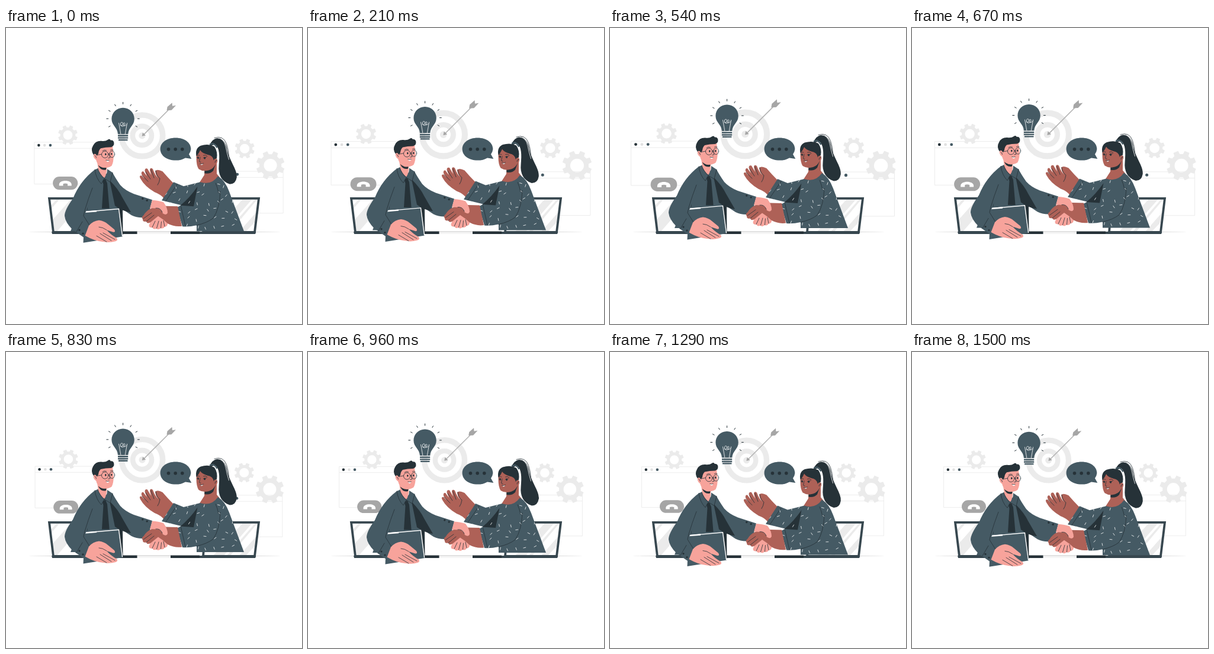
These frames come from a looping animation (500 px wide and 500 px high, 1.54 s). An HTML page:

```html
<!DOCTYPE html>
<html lang="en">
<head>
<meta charset="utf-8">
<title>Handshake</title>
<style>
html, body { margin: 0; width: 100%; height: 100%; overflow: hidden; background: #fff; }
svg { display: block; width: 100vw; height: 100vh; }
.slate { fill: #455a64; }
.ink { fill: #263238; }
.pale { fill: #ebebeb; }
.grey { fill: #a6a6a6; }
.rose { fill: #f7a39b; }
.brown { fill: #ae6157; }
.white { fill: #fff; }
.line { fill: none; stroke: #263238; stroke-width: .8; stroke-linecap: round; stroke-linejoin: round; }
.frame { fill: #fff; stroke: #ebebeb; stroke-width: .9; }
.thin { fill: none; stroke: #fff; stroke-width: .8; stroke-linecap: round; }
</style>
</head>
<body>
<svg viewBox="0 0 500 500">
  <defs>
    <clipPath id="dress">
      <path d="M328 260Q347 266 358 250Q370 257 377 276L402 343H322V333Q309 336 298 335L288.5 303L296 299L263 291L283 260L300 267Z"/>
    </clipPath>
    <clipPath id="screenL"><path d="M75 290H166L162 344H82Z"/></clipPath>
    <clipPath id="screenR"><path d="M334 290H425L418 344H338Z"/></clipPath>
  </defs>

  <ellipse cx="251" cy="344.4" rx="213" ry=".7" fill="#d0d0d0"/>

  <g id="back">
    <path class="frame" d="M48.5 193H165V263.5H48.5ZM48.5 203.3H165"/>
    <circle class="ink" cx="56" cy="198.2" r="2.3"/>
    <circle cx="65.8" cy="198.2" r="2.3" fill="#e0e0e0"/>
    <circle class="slate" cx="75.5" cy="198.2" r="2.3"/>
    <path class="frame" d="M360 242H467.5V312.5H360ZM360 252.3H467.5"/>
    <circle class="slate" cx="390.3" cy="247.2" r="2.4"/>
    <g id="gears" class="pale" fill-rule="evenodd"></g>
    <g fill="none" stroke="#ebebeb">
      <circle cx="230" cy="182" r="34.7" stroke-width="9.6"/>
      <circle cx="230" cy="182" r="16" stroke-width="8.6"/>
    </g>
    <circle class="pale" cx="230" cy="182" r="5.6"/>
    <path d="M232 181L276 137" stroke="#b2b2b2" stroke-width="1.5"/>
    <path class="grey" d="M229.7 183L231 176.8L236 181.6ZM271.5 139.5L272.5 133.5L280.5 126.5L281 132L287 131L279.5 139Z"/>
    <rect class="grey" x="79.7" y="251" width="42" height="22" rx="11"/>
    <path class="white" d="M90.3 264C91 256 110.5 256 111.2 264V266.4H104.6V263Q100.7 261.6 97 263V266.4H90.3Z"/>
  </g>

  <g>
    <path class="white" d="M73 288H168L164 345H80Z"/>
    <path class="white" d="M332 288H427L420 345H334Z"/>
    <g class="pale" clip-path="url(#screenL)">
      <path d="M76 327L109 290H133L84 346ZM74 302L86 289H91L75 307Z"/>
    </g>
    <g class="pale" clip-path="url(#screenR)">
      <path d="M349 345L400 289H416L367 345ZM372 345L421 289H425L378 345ZM393 345L424 310V324L404 345Z"/>
    </g>
    <g fill="none" stroke="#37474f" stroke-width="3.8">
      <path d="M73 287.9H168L164 345H80Z"/>
      <path d="M338 287.9H427L420 345H333Z"/>
    </g>
    <path fill="#37474f" d="M77 344H197V348H78ZM326 344H422L421 348H326Z"/>
    <path fill="#f5f5f5" d="M221 343.6H278V348H221Z"/>
    <path fill="#d0d0d0" d="M221 343.6H278V344.6H221Z"/>
    <path class="ink" d="M180 343.6H221.5V348H180ZM278 343.6H327V348H278Z"/>
  </g>

  <g>
    <path class="slate" d="M286.5 185.5C302 185.5 312.4 194 312.4 204.5Q312 209.5 309 213.3L313.3 221L303 219.4Q296 223.6 286.5 223.6C271 223.6 260.6 215 260.6 204.5S271 185.5 286.5 185.5Z"/>
    <g class="ink"><circle cx="274.5" cy="204.8" r="2.8"/><circle cx="286.2" cy="204.8" r="2.8"/><circle cx="297.8" cy="204.8" r="2.8"/></g>
  </g>

  <g id="front">
    <!-- bulb -->
    <g id="rays" stroke="#263238" stroke-width="1" stroke-linecap="round"></g>
    <path class="slate" d="M197.6 134.5C208.5 134.5 216.8 143 216.8 153.3C216.8 165 207 167 206.3 179H189C188.3 167 178.4 165 178.4 153.3C178.4 143 186.8 134.5 197.6 134.5Z"/>
    <path class="slate" d="M189 180.4H206.2V183H189ZM189 184.2H206.2V186.6H189ZM190 187.7H205.5V190H190Z"/>
    <path class="thin" d="M193.8 178.5L190.6 160.5M201.4 178.5L204.6 160.5M193 164C195 167 198.5 163 197.5 160.5S193 159 193.5 162.5S198 167 200 164S200.5 158.5 198.5 160.8S200 168 203.5 163"/>

    <!-- man -->
    <path class="slate" d="M150 239L168 246L180 244Q184 252 193 265Q201 274 216 280L247 290L240 319Q224 322 212 316L197 306V343H109Z"/>
    <path class="ink" d="M175 257Q190 272 196 285L211 311Q196 309 184 300Z"/>
    <path class="ink" d="M162.5 256.5L168 255L171 262L174.6 304.5H162L164.5 264Z"/>
    <path class="rose" d="M153 218L156 240Q160 249 166 253Q171 247 170 233Z"/>
    <path class="slate" d="M150 239L155 237Q158 247 166 253L161 263Q152 253 150 239ZM171 238L180 244L176 260L166 254Q171 248 171 238Z"/>
    <path class="line" d="M150 239Q152 254 161 263L166 254L176 260L180 244M155 237Q158 247 166 254M146 270Q138 290 137 307"/>
    <path class="ink" d="M155.8 231.5Q164 237 169.8 234.5L169 239Q160 241.5 155.8 231.5Z"/>
    <path class="rose" d="M152 209Q150.5 214 151.5 220Q154 233 163 235.6Q172 237 178.5 232.5Q182 226 181.7 214L180 199L160 197Z"/>
    <path class="rose" d="M154.5 214Q149 209.5 147.6 214.5Q147.8 221 154 223.5Z"/>
    <path class="ink" d="M147.8 214Q142.5 206 147 198.5Q151 190 161 190.5Q168 191.5 172 188.5Q175 186 177 189.5Q181 188.5 182.3 193Q183.5 199 177.5 201Q168 201 160 203Q156.5 206 156 212L153.5 215.5Q150.5 210 147.8 214Z"/>
    <g class="line">
      <circle cx="167.2" cy="213.6" r="5.7"/>
      <ellipse cx="179.2" cy="213" rx="4.4" ry="5.5"/>
      <path d="M161.5 213L153.5 214.5M173 212.5Q174 211.5 175 212.3M174.5 213L175.8 219L172.5 219.5M163 207.5Q166 204.8 169.5 206.6M176.5 206Q178.5 204.5 181 206M150 215Q152 215.5 152.5 219"/>
    </g>
    <ellipse class="ink" cx="168.3" cy="213" rx="1.3" ry="1.8"/>
    <ellipse class="ink" cx="178.2" cy="212.6" rx="1.2" ry="1.8"/>
    <path class="white" d="M168.8 223Q171.5 224.3 174.3 223Q173.5 226.3 171.6 226Q169.8 225.5 168.8 223Z"/>
    <path class="line" d="M168.8 223Q171.5 224.3 174.3 223"/>
    <circle class="ink" cx="230.8" cy="288" r="1.7"/>
    <circle class="ink" cx="238.2" cy="291" r="1.7"/>

    <!-- woman -->
    <path class="ink" d="M343 200Q347 187 358 185.5Q369 187 373 202C376 223 391 238 389.8 252Q388 263.5 378 263.5C364 259 358 247 359.6 232C361 215 361 202 353 196Z"/>
    <path class="line" d="M352 185.5Q367 180.5 372.5 195.5Q376 206 376.5 216"/>
    <path class="thin" d="M357 185.5Q368 186 371 200Q373 211 376.5 222"/>
    <path class="brown" d="M336 230L335 248L326 262Q344 274 361 252L356 246V222Z"/>
    <path class="ink" d="M335.5 237Q347 242 354 230L350 241Q344 247 335.3 245Z"/>
    <path class="brown" d="M283 262Q273 252 264.5 242Q256 237.5 252 241Q252.5 248 257 253Q252 249 248 238Q243.5 234.5 243 240L245 248L239 237.5Q234.5 236 234.5 241L238 250L232 242Q228 241.5 229 247L234 254L229 249Q224 248.5 227 254Q234 267 251 277Q262 281 267 288Z"/>
    <path class="line" d="M236 243L244 255M245 239L250 253M230 249L240 259M253 241Q254 250 260 254Q259 261 256 265"/>
    <path class="slate" d="M328 260Q347 266 358 250Q370 257 377 276L402 343H322V333Q309 336 298 335L288.5 303L296 299L263 291L283 260L300 267Z"/>
    <path class="ink" d="M323.5 267.5L317 301L294.5 299.5Q310 287 323.5 267.5Z"/>
    <g id="ticks" class="thin" clip-path="url(#dress)"></g>
    <path class="line" d="M362 276Q361 305 350 321Q340 329 322 333M289 264L270 292M295.5 301L303 334M359 278Q357 268 354 262"/>
    <g transform="translate(0 2)">
      <path class="brown" d="M333 201Q321 201 321.5 217Q321.5 230 325.5 236Q333 241 343 238Q352 235 354 226L354 208Z"/>
      <path class="ink" d="M321.5 214Q319 201 329 196.5Q342 192.5 352 198Q358 207 356 218L351 222Q350 213 340 211.5Q331 209 328 204Q325 211 321.5 214Z"/>
      <path d="M344 194.5L349.5 193Q354 195 356.5 200" fill="none" stroke="#455a64" stroke-width="2.4"/>
      <path class="brown" d="M350.8 221Q354 216 357 220.5Q358 227 351.5 229.5Z"/>
      <path class="line" d="M353 225Q353 221.5 356 221M328 216L326.5 223.5L329 224.5M333.5 213Q337 211 340 214.5M322.5 213.5Q324.5 211.5 327 213"/>
      <ellipse class="ink" cx="335.6" cy="217.5" rx="1.5" ry="1.9"/>
      <ellipse class="ink" cx="324.6" cy="217.2" rx="1.3" ry="1.8"/>
      <path class="line" d="M333.5 217L338.5 216M322.5 216.2L325.5 216"/>
      <path class="white" d="M328 227.5Q330.5 228.6 333 226.8Q332 229.6 330.2 229.4Z"/>
      <path class="line" d="M327.5 227.2Q330.5 228.6 333.5 226.4"/>
    </g>

    <!-- handshake -->
    <path class="rose" d="M262 316Q252 315 246 322L241.5 333Q242 338 247 336.5Q249 341 254 338.5Q257 341.5 261 338Q266 339.5 268 335.5Q273.5 335 273 329Q271 322 262 316Z"/>
    <path class="line" d="M247 336.5L252 326M254.5 338L258 326M261.5 337.5L262.5 327M268 335L266 325"/>
    <path class="brown" d="M290 301L270 300.5Q257 299 246 304Q237 308 232.5 316Q228 319 231 323Q231 328 237 326.5Q238 331 244 328L257 317.5Q266 323 273 330Q284 336 297 334.5Z"/>
    <path class="rose" d="M247 290.5Q258 291 266 294Q273 303 273 312Q271 317 265 313Q262 306 257 304.5L243 304Z"/>
    <path class="line" d="M232.5 321.5L246 312M237 326.5L250 316M253 304Q261 303 264 311"/>

    <!-- book and holding arm -->
    <path class="ink" d="M190 304.5L197 303.5L197.5 349L194 352Z"/>
    <path class="slate" d="M133 310L190 305L197 352L130.5 362.5Z"/>
    <path d="M133.5 310.3L190.5 305.3L196.6 351.5" fill="none" stroke="#fff" stroke-width="1.4"/>
    <path d="M133 310.6L153 309" stroke="#fff" stroke-width="2.4"/>
    <path class="slate" d="M150 239Q125 258 113 288Q99 307 99 317Q100 328 112 340L132 354L141 333L132 318Q139 298 146 286Z"/>
    <path class="line" d="M146 270Q139 288 133 308L131 317L141 333M119 344L129 327"/>
    <path class="rose" d="M140 333.5Q147 325.5 157 324.5Q166 325.5 172 331L183 340Q186 345 181 344.5L170 341Q177 349 187 354.5Q190 358 185 360Q175 363 165 361Q150 360 133.5 350.5Z"/>
    <path class="line" d="M157 336Q163 336 170 341M159 347L178 359M153 351L170 361M164 346L184 357"/>
    <circle class="ink" cx="124" cy="341" r="1.6"/>
    <circle class="ink" cx="130" cy="347" r="1.6"/>
  </g>
</svg>
<script>
const LOOP = 1540;
const $ = id => document.getElementById(id);

function gear(cx, cy, r, hole) {
  const step = Math.PI / 4;
  const at = (a, d) => (cx + d * Math.cos(a)).toFixed(2) + ' ' + (cy + d * Math.sin(a)).toFixed(2);
  let d = '';
  for (let i = 0; i < 8; i++) {
    const a = (i + 0.5) * step;
    d += (i ? 'L' : 'M') + at(a - 0.25, r * 0.8) + 'L' + at(a - 0.17, r * 1.03) +
      'L' + at(a + 0.17, r * 1.03) + 'L' + at(a + 0.25, r * 0.8);
  }
  d += `ZM${cx - hole} ${cy}a${hole} ${hole} 0 1 0 ${2 * hole} 0a${hole} ${hole} 0 1 0 ${-2 * hole} 0Z`;
  return `<path d="${d}"/>`;
}
$('gears').innerHTML = gear(105, 181, 16.2, 7.8) + gear(402.7, 203.8, 16.4, 8) + gear(446, 232, 23.5, 11);

let rays = '';
for (let i = 0; i < 9; i++) {
  const a = (150 + i * 30) * Math.PI / 180, c = Math.cos(a), s = Math.sin(a);
  rays += `<path d="M${197.6 + 24.8 * c} ${153 + 24.8 * s}L${197.6 + 27.8 * c} ${153 + 27.8 * s}"/>`;
}
$('rays').innerHTML = rays;

// Scattered dashes on the dress
let seed = 11;
const rnd = () => (seed = seed * 16807 % 2147483647) / 2147483647;
let ticks = '';
for (let y = 260; y < 345; y += 14) {
  for (let x = 270; x < 404; x += 16) {
    const px = x + rnd() * 9, py = y + rnd() * 8, a = rnd() * Math.PI;
    ticks += `M${px} ${py}l${4 * Math.cos(a)} ${4 * Math.sin(a)}`;
  }
}
$('ticks').innerHTML = `<path d="${ticks}"/>`;

// cubic-bezier(.25, .1, .25, 1)
function ease(x) {
  let lo = 0, hi = 1, u = x;
  for (let i = 0; i < 22; i++) {
    u = (lo + hi) / 2;
    if (0.75 * u * (1 - u) + u * u * u < x) lo = u; else hi = u;
  }
  return 0.3 * u * (1 - u) * (1 - u) + 3 * u * u * (1 - u) + u * u * u;
}

const beat = [[-36, 0.976], [160, 1.077], [405, 0.976], [590, 1.066], [1110, 0.976], [1504, 0.976], [1700, 1.077]];
function pulse(t) {
  const i = beat.findIndex(k => k[0] > t);
  const [t0, a] = beat[i - 1], [t1, b] = beat[i];
  return a + (b - a) * ease((t - t0) / (t1 - t0));
}

function draw(t) {
  $('back').setAttribute('transform', `translate(258 224) scale(${pulse(t).toFixed(5)}) translate(-258 -224)`);
  const lift = -2.6 - 2.9 * Math.cos((t - 700) / LOOP * 2 * Math.PI);
  $('front').setAttribute('transform', `translate(0 ${lift.toFixed(3)})`);
}

function tick() {
  draw(performance.now() % LOOP);
  requestAnimationFrame(tick);
}
tick();
</script>
</body>
</html>
```
